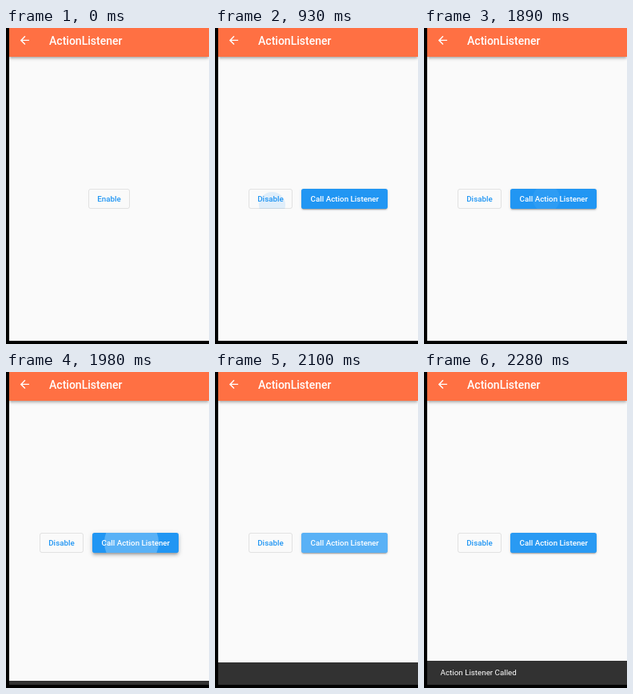
An HTML page for the animation above (4.29 s loop, 254x395 px).

```html
<!DOCTYPE html>
<html lang="en">
<head>
<meta charset="utf-8">
<title>ActionListener</title>
<style>
  html, body { margin: 0; width: 100%; height: 100%; overflow: hidden; background: #000; }
  #stage { position: relative; width: 254px; height: 395px; overflow: hidden; background: #000;
    font: 500 9.8px/1 Roboto, sans-serif; white-space: nowrap; }
  #screen { position: absolute; left: 4px; top: 0; width: 250px; height: 391.3px; overflow: hidden; background: #fafafa; }
  #bar { position: absolute; left: 0; top: 0; width: 100%; height: 35.5px; background: #ff7043;
    box-shadow: 0 1.4px 2.8px -.7px #0003, 0 2.8px 3.5px #00000024, 0 .7px 7px #0000001f; }
  #bar svg { position: absolute; left: 10.8px; top: 7.3px; width: 16.8px; height: 16.8px; fill: #fff; }
  #title { position: absolute; left: 50px; top: 8px; font-size: 14px; line-height: 16px; color: #fff; }
  .button { position: absolute; top: 200.5px; height: 25.2px; box-sizing: border-box; border-radius: 2.8px; }
  .ink { position: absolute; inset: 0; overflow: hidden; border-radius: inherit; }
  .ink i { position: absolute; border-radius: 50%; }
  .label { position: absolute; inset: 0; text-align: center; line-height: 25.2px; }
  #toggle { color: #2196f3; }
  #toggle i { background: #2196f3; }
  #toggle::after { content: ""; position: absolute; inset: 0; border: 1px solid #00000019; border-radius: inherit; }
  #call { left: 104.4px; width: 107.8px; background: #2196f3; color: #fff; }
  #call i { background: #fff; }
  #snack { position: absolute; left: 0; bottom: 0; width: 100%; background: #323232; overflow: hidden; }
  #message { position: absolute; left: 16.6px; top: 9px; line-height: 12px; font-weight: 400; color: #fff; }
</style>
</head>
<body>
<div id="stage">
  <div id="screen">
    <div class="button" id="toggle"><div class="ink"><i></i></div><span class="label"></span></div>
    <div class="button" id="call"><div class="ink"><i></i></div><span class="label">Call Action Listener</span></div>
    <div id="bar">
      <svg viewBox="0 0 24 24"><path d="M20 11H7.83l5.59-5.59L12 4l-8 8 8 8 1.41-1.41L7.83 13H20z"/></svg>
      <div id="title">ActionListener</div>
    </div>
    <div id="snack"><div id="message">Action Listener Called</div></div>
  </div>
</div>
<script>
  const LOOP = 4290, STEP = 30, SWITCH = 900, SNACK = 1925, SNACK_HEIGHT = 30.4;
  const HEIGHT = 25.2;
  const $ = selector => document.querySelector(selector);
  const clamp = v => Math.min(1, Math.max(0, v));
  const mix = (a, b, k) => a + (b - a) * k;
  const span = (t, from, to) => clamp((t - from) / (to - from));

  function bezier(x1, y1, x2, y2) {
    const at = (a, b, s) => 3 * (1 - s) ** 2 * s * a + 3 * (1 - s) * s * s * b + s ** 3;
    return x => {
      if (x <= 0 || x >= 1) return clamp(x);
      let low = 0, high = 1;
      for (let i = 0; i < 24; i++) {
        const mid = (low + high) / 2;
        if (at(x1, x2, mid) < x) low = mid; else high = mid;
      }
      return at(y1, y2, low);
    };
  }
  const ease = bezier(.25, .1, .25, 1);
  const fastOutSlowIn = bezier(.4, 0, .2, 1);

  // Touch ripple: fades in on press, spreads on release, then fades out.
  function drawRipple(dot, t, { press, release, x, y, alpha, reach }, width) {
    const grow = ease(span(t, release, release + 225));
    const radius = mix(reach * .3, reach + 5, grow);
    const cx = mix(x, width / 2, grow), cy = mix(y, HEIGHT / 2, grow);
    const opacity = alpha * span(t, press, press + 75) * (1 - span(t, release + 225, release + 375));
    Object.assign(dot.style, {
      left: cx - radius + "px", top: cy - radius + "px",
      width: 2 * radius + "px", height: 2 * radius + "px", opacity
    });
  }
  const toggleTap = { press: 835, release: 885, x: 30.5, y: 23.5, alpha: .12, reach: 29 };
  const callTap = { press: 1873, release: 1925, x: 44.5, y: 12.6, alpha: .25, reach: 55.4 };

  function shadow(lift) {
    const layer = (y, blur, spread, alpha) => `0 ${y}px ${blur}px ${spread}px rgba(0,0,0,${alpha})`;
    return [
      layer(mix(2.1, 3, lift), mix(.7, 2.5, lift), -1.4, .2),
      layer(mix(1.4, 3, lift), mix(1.4, 4, lift), 0, .14),
      layer(mix(.7, 1.5, lift), mix(3.5, 6, lift), mix(0, .7, lift), .12)
    ].join();
  }

  function sample(t) {
    for (const [from, to] of [[0, 840], [1020, 1170], [1170, 1230], [1230, 1890], [2280, LOOP]])
      if (t >= from && t < to) return from;
    return Math.floor(t / STEP) * STEP;
  }

  function draw(time) {
    const t = sample(time);
    const enabled = t >= SWITCH;
    const width = enabled ? 55 : 52;
    const toggle = $("#toggle"), call = $("#call");
    toggle.style.left = (enabled ? 38 : 99) + "px";
    toggle.style.width = width + "px";
    $("#toggle .label").textContent = enabled ? "Disable" : "Enable";
    drawRipple($("#toggle i"), t < 1890 ? t : LOOP, toggleTap, width);

    call.style.visibility = enabled ? "visible" : "hidden";
    call.style.boxShadow = shadow(span(t, 1880, 1960) * (1 - span(t, 1980, 2100)));
    drawRipple($("#call i"), t, callTap, 107.8);

    const progress = span(t, SNACK, SNACK + 250);
    $("#snack").style.height = SNACK_HEIGHT * fastOutSlowIn(progress) + "px";
    $("#message").style.opacity = fastOutSlowIn(span(progress, .72, 1));
  }

  const start = performance.now();
  function tick() {
    draw((performance.now() - start) % LOOP);
    requestAnimationFrame(tick);
  }
  tick();
</script>
</body>
</html>
```
